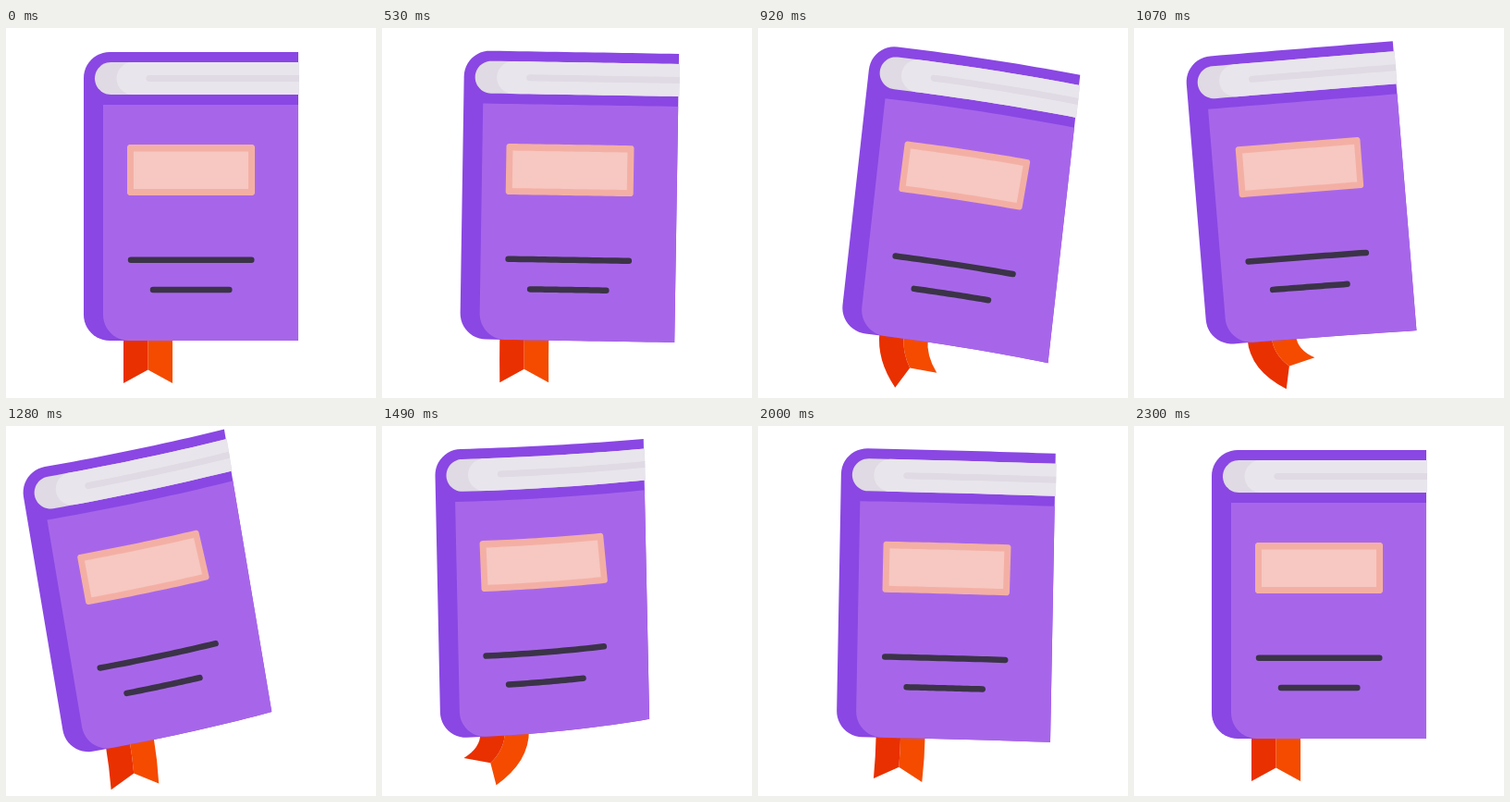
An HTML page with a canvas for the animation above (2330 ms loop, 400 by 400 pixels).

```html
<!DOCTYPE html>
<html lang="en">
<head>
<meta charset="utf-8">
<title>Swinging book</title>
<style>
  html, body { margin: 0; width: 100%; height: 100%; overflow: hidden; background: #fff; }
  canvas { display: block; width: 400px; height: 400px; }
</style>
</head>
<body>
<canvas id="stage" width="400" height="400"></canvas>
<script>
const ctx = document.getElementById('stage').getContext('2d');
const LOOP = 2330, START = 530, STEP = 30;
const LEFT = 84, TOP = 26, WIDTH = 232, HEIGHT = 312;
const PIVOT = { x: 200, y: 338 };

// time, angle, shift x, shift y, bend at top, bend at bottom, squeeze, ribbon angle
const POSES = [
  [500, 0, 0, 0, 0, 0, 0, 0],
  [530, 0.9, 0.2, 0, 0.1, 0.1, 0, 1],
  [710, 14.3, 6.5, 5, 13.8, 14, -4, 4],
  [745, 15, 6.8, 5, 14, 14.5, -4, 8],
  [1040, -2.7, -0.5, -2.5, 2, 4, -5, 40],
  [1070, -4.7, -4, -4.2, 0, 2, -6, 43],
  [1230, -10.2, -18.5, -4, -8, -8, -6, 8],
  [1490, -1.2, -20.5, -3.3, -7, -16, -6, -42],
  [1580, 0.9, -12, -2.5, -3, -8, -5, -27],
  [1760, 2.9, 1.5, -0.6, 6.5, 5.5, -2, 14],
  [1960, 1.4, 0.8, -0.2, 2.5, 2.5, -0.8, -4],
  [2120, 0.2, 0.1, 0, 0.2, 0.2, -0.1, 2],
  [2300, 0, 0, 0, 0, 0, 0, 0]
];

// Monotone cubic through the poses: flat at every extreme.
function secant(i, k) {
  if (i < 0 || i >= POSES.length - 1) return 0;
  return (POSES[i + 1][k] - POSES[i][k]) / (POSES[i + 1][0] - POSES[i][0]);
}
function slope(i, k) {
  const a = secant(i - 1, k), b = secant(i, k);
  return a * b <= 0 ? 0 : 2 * a * b / (a + b);
}
function sample(time, k) {
  const last = POSES.length - 1;
  if (time <= POSES[0][0] || time >= POSES[last][0]) return 0;
  let i = 0;
  while (time >= POSES[i + 1][0]) i++;
  const span = POSES[i + 1][0] - POSES[i][0];
  const p = (time - POSES[i][0]) / span, q = 1 - p;
  return POSES[i][k] * q * q * (1 + 2 * p) + POSES[i + 1][k] * p * p * (3 - 2 * p) +
    span * p * q * (slope(i, k) * q - slope(i + 1, k) * p);
}

let pose;
function setPose(time) {
  const [angle, dx, dy, bendTop, bendBottom, squeeze, ribbon] =
    [1, 2, 3, 4, 5, 6, 7].map(k => sample(time, k));
  const rad = Math.PI / 180;
  pose = {
    cos: Math.cos(angle * rad), sin: Math.sin(angle * rad),
    dx, dy, bendTop, bendBottom, squeeze, ribbon: ribbon * rad
  };
}

// Bends and rotates a point of the flat book; tiltY makes a part lean with the curve.
function warp([x, y], tiltY) {
  const u = Math.max(0, (x - LEFT) / WIDTH);
  const bend = pose.bendTop + (pose.bendBottom - pose.bendTop) * (y - TOP) / HEIGHT;
  const lean = tiltY === undefined ? 0 : 2 * bend * u / WIDTH * (y - tiltY);
  const px = x + pose.dx + pose.squeeze * u ** 3 - lean - PIVOT.x;
  const py = y + pose.dy + bend * u * u - PIVOT.y;
  return [PIVOT.x + px * pose.cos - py * pose.sin, PIVOT.y + px * pose.sin + py * pose.cos];
}

function trace(points, tiltY) {
  ctx.beginPath();
  points.forEach(p => ctx.lineTo(...warp(p, tiltY)));
}

// Rounded box as points; radii run clockwise from top left.
function box(x0, y0, x1, y1, [tl, tr, br, bl], color, tiltY) {
  const points = [];
  const corner = (cx, cy, r, from) => {
    const n = r ? 12 : 0;
    for (let i = 0; i <= n; i++) {
      const a = from + (n ? i / n : 0) * Math.PI / 2;
      points.push([cx + r * Math.cos(a), cy + r * Math.sin(a)]);
    }
  };
  const edge = (xa, xb, y) => {
    for (let i = 1; i < 20; i++) points.push([xa + (xb - xa) * i / 20, y]);
  };
  corner(x0 + tl, y0 + tl, tl, Math.PI);
  edge(x0 + tl, x1 - tr, y0);
  corner(x1 - tr, y0 + tr, tr, Math.PI * 1.5);
  corner(x1 - br, y1 - br, br, 0);
  edge(x1 - br, x0 + bl, y1);
  corner(x0 + bl, y1 - bl, bl, Math.PI / 2);
  trace(points, tiltY);
  ctx.fillStyle = color;
  ctx.fill();
}

function line(x0, x1, y, color, cap) {
  const points = [];
  for (let i = 0; i <= 20; i++) points.push([x0 + (x1 - x0) * i / 20, y]);
  trace(points);
  ctx.strokeStyle = color;
  ctx.lineWidth = 6.5;
  ctx.lineCap = cap;
  ctx.stroke();
}

function ribbon() {
  const a = pose.ribbon, base = [153.5, 334];
  const move = ([x, y], angle, d) => [x + Math.sin(angle) * d, y + Math.cos(angle) * d];
  const tip = move(base, a * 0.8, 50);
  const notch = move(tip, a * 1.25, -14.5);
  const half = 26.5 - 4.5 * Math.min(1, Math.abs(a));

  const side = (dir, color) => {
    const root = [base[0] + 26.5 * dir, base[1]];
    const end = [tip[0] + Math.cos(a) * half * dir, tip[1] - Math.sin(a) * half * dir];
    const control = (from, to) =>
      warp([from[0], from[1] + Math.hypot(to[0] - from[0], to[1] - from[1]) / 2]);
    ctx.beginPath();
    ctx.moveTo(...warp(root));
    ctx.quadraticCurveTo(...control(root, end), ...warp(end));
    ctx.lineTo(...warp(notch));
    ctx.quadraticCurveTo(...control(base, notch), ...warp(base));
    ctx.closePath();
    ctx.fillStyle = color;
    ctx.fill();
  };
  side(1, '#f44b00');
  side(-1, '#e93000');
}

function draw(time) {
  setPose(time);
  ctx.fillStyle = '#fff';
  ctx.fillRect(0, 0, 400, 400);
  ribbon();

  // cover
  box(84, 26, 316, 338, [28, 0, 0, 28], '#8a47e3');
  box(105, 83, 316, 338, [0, 0, 0, 28], '#a766ea');

  // pages
  box(96, 37, 317, 72, [17.5, 0, 0, 17.5], '#dfdae3');
  box(119.5, 37, 317, 72, [17.5, 0, 0, 17.5], '#e9e5ec');
  box(151.5, 51, 317, 58, [3.5, 0, 0, 3.5], '#dfdae3');

  // label and lines
  box(131, 126, 269, 181, [3, 3, 3, 3], '#f4afa5', 153.5);
  box(138, 133.5, 262, 174, [0, 0, 0, 0], '#f6c8c1', 153.5);
  line(135, 265.3, 250.7, '#3b3347', 'round');
  line(159, 241.3, 283, '#3b3347', 'round');
}

const origin = performance.now();
function tick() {
  const t = (performance.now() - origin) % LOOP;
  draw(t < START ? 0 : START + Math.floor((t - START) / STEP) * STEP);
  requestAnimationFrame(tick);
}
tick();
</script>
</body>
</html>
```
